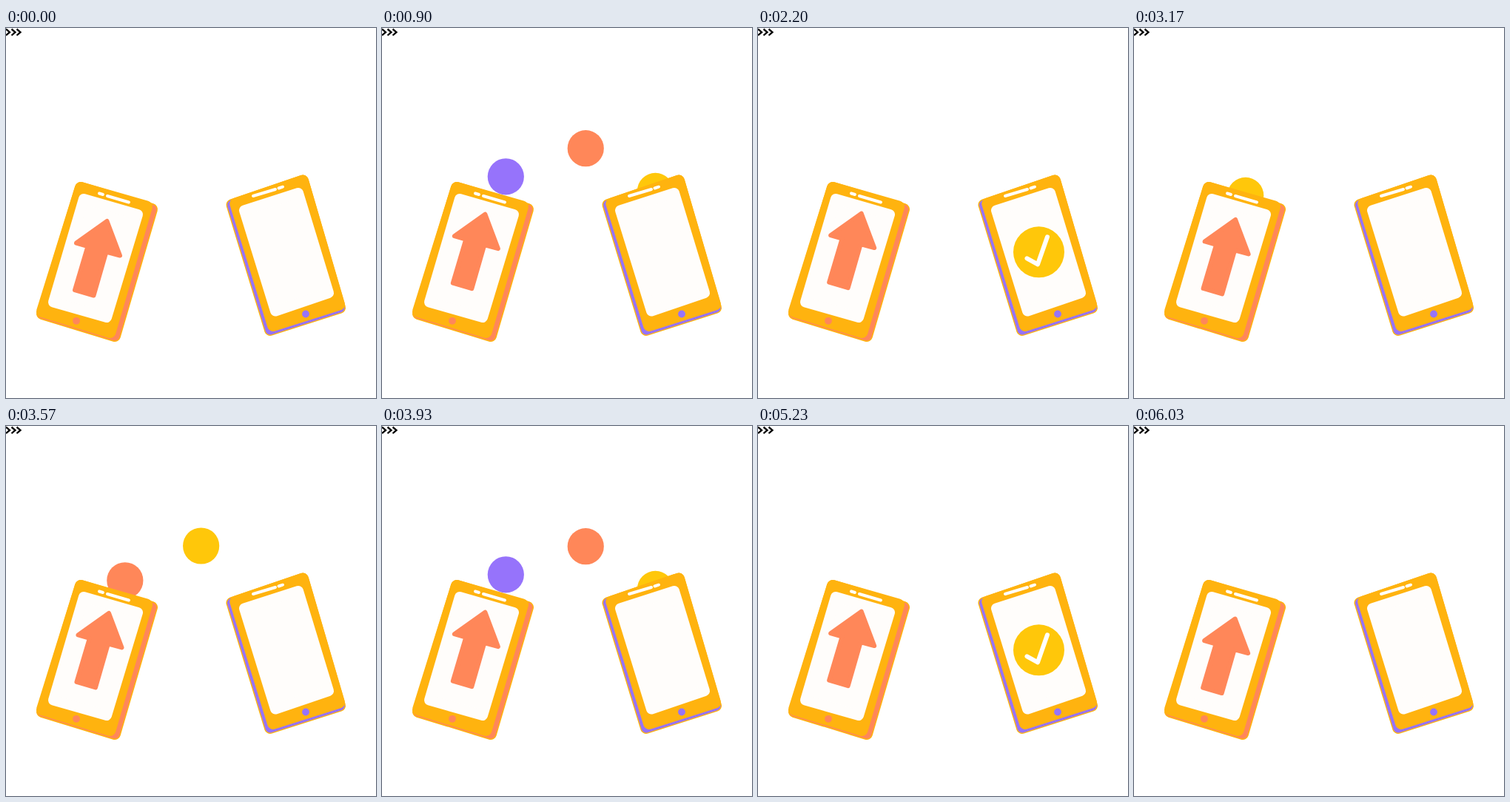
An HTML page for the animation above (6060 ms loop, 500 px wide and 500 px high).

```html
<!DOCTYPE html>
<html>
<head>
<meta charset="utf-8">
<style>
  html, body { margin: 0; width: 100%; height: 100%; overflow: hidden; background: #fff; }
  svg { display: block; width: 100vw; height: 100vh; stroke-linejoin: round; stroke-linecap: round; }
  .body { fill: #ffb30f; stroke: #ffb30f; stroke-width: 16; }
  .side { fill: none; stroke-width: 13; }
  .screen { fill: #fffdfb; stroke: #fffdfb; stroke-width: 14; }
  .line { fill: none; stroke: #fff; stroke-width: 4; }
  .orange { fill: #ff8759; }
  .purple { fill: #9673fb; }
  .yellow { fill: #ffc70a; }
</style>
</head>
<body>
<svg viewBox="0 0 500 500">
  <g id="balls">
    <circle class="ball yellow" r="24.6"/>
    <circle class="ball orange" r="24.6"/>
    <circle class="ball purple" r="24.6"/>
  </g>

  <g id="sender">
    <path class="body" d="M101 216 L197 245 L147 416 L49 386Z"/>
    <path class="side" stroke="#ff8759" d="M197 245 L147 416 L49 386"/>
    <path class="body" d="M101 216 L190 241.5 L140.5 411 L49 383Z"/>
    <path class="screen" d="M105 231 L178 252 L136 391 L64 370.5Z"/>
    <path class="line" d="M126 223.5 L131 225 M137 227 L166 235.5"/>
    <circle class="orange" cx="95" cy="395.8" r="4.9"/>
    <path id="arrow" class="orange" stroke="#ff8759" stroke-width="6"
      d="M136.5 261 L154 307.5 L135.5 302.5 L118.5 361.5 L93 354 L110.5 295 L95 290.5Z"/>
  </g>

  <g id="receiver">
    <path class="body" d="M305.5 239 L401 206.5 L451 378 L357 408Z"/>
    <path class="side" stroke="#9673fb" d="M305.5 239 L357 408 L451 378"/>
    <path class="body" d="M310.3 237.5 L401 206.5 L450 373.7 L361 402Z"/>
    <path class="screen" d="M322 246.5 L395 223 L436 358 L364 382.5Z"/>
    <path class="line" d="M334 227 L364 218 M368.5 216.5 L374 214.7"/>
    <circle class="purple" cx="405" cy="386.5" r="4.9"/>
    <g id="check">
      <circle class="yellow" r="34.5"/>
      <path d="M-16 8.5 L-1.5 16.5 L11.5 -20.5" fill="none" stroke="#fff" stroke-width="6"/>
    </g>
  </g>

  <path d="M0 1.5 L5 5.7 L0 10 M7.5 1.5 L12.5 5.7 L7.5 10 M14.5 1.5 L19.5 5.7 L14.5 10"
    fill="none" stroke="#000" stroke-width="2.3" stroke-linecap="butt" stroke-linejoin="miter"/>
</svg>
<script>
  const CYCLE = 3030, FRAME = 100 / 3;
  const FLIGHT = 1005, FIRST = 25, GAP = 335;
  const balls = document.querySelectorAll('.ball');
  const arrow = document.getElementById('arrow');
  const check = document.getElementById('check');
  const clamp = v => Math.max(0, Math.min(1, v));
  const backOut = p => 1 + 2.7 * (p - 1) ** 3 + 1.7 * (p - 1) ** 2;
  const move = (el, x, y, s = 1) =>
    el.setAttribute('transform', `translate(${x} ${y}) scale(${s})`);

  function draw(t) {
    // balls leave one phone and drop behind the other
    balls.forEach((ball, i) => {
      const a = Math.PI * (1 - clamp((t - FIRST - i * GAP) / FLIGHT));
      move(ball, 261.5 + 117.5 * Math.cos(a), 258.5 - 96.5 * Math.sin(a));
    });

    const phase = t / (CYCLE / 2) % 1;
    const lift = 1 - Math.abs(1 - 2 * phase);
    move(arrow, 3.5 * lift, -11.5 * lift);

    const grow = backOut(clamp((t - 1600) / 320));
    const shrink = 1 - clamp((t - 2620) / 260) ** 1.5;
    move(check, 379.5, 302.8, Math.max(0, grow * shrink));
  }

  const start = performance.now();
  function tick() {
    const t = (performance.now() - start) % (2 * CYCLE);
    draw(Math.floor((t % CYCLE) / FRAME + 0.1) * FRAME);
    requestAnimationFrame(tick);
  }
  tick();
</script>
</body>
</html>
```
